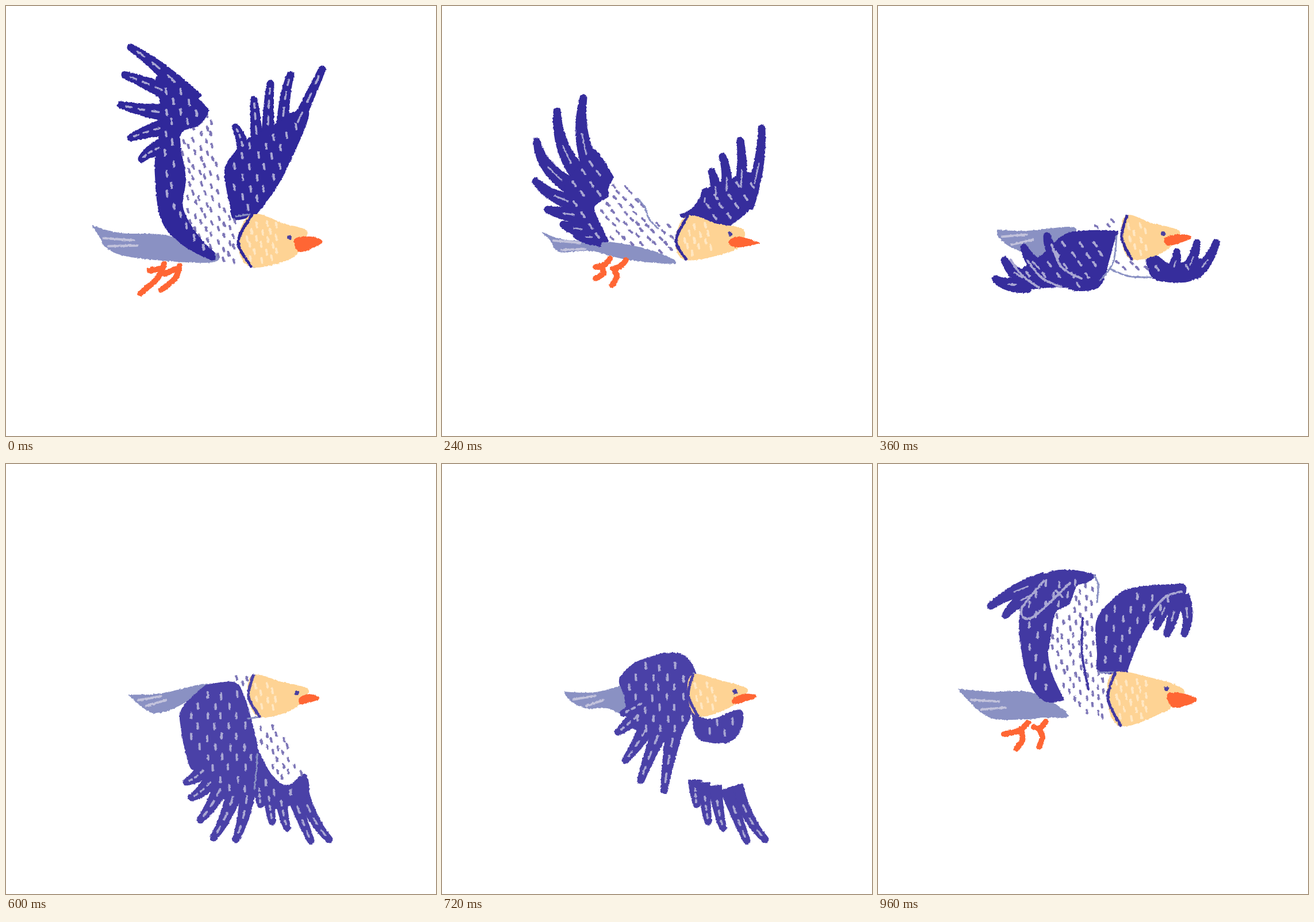
An HTML page that plays this animation: 748x748 px, repeating every 1080 ms.

```html
<!DOCTYPE html>
<html lang="en">
<head>
<meta charset="utf-8">
<title>Flying bird</title>
<style>
html, body { margin: 0; width: 100%; height: 100%; overflow: hidden; background: #fff; }
svg { display: block; width: 100vw; height: 100vh; }
path { stroke-linecap: round; stroke-linejoin: round; }
</style>
</head>
<body>
<svg viewBox="0 0 748 748">
  <filter id="chalk" filterUnits="userSpaceOnUse" x="0" y="0" width="748" height="748" color-interpolation-filters="sRGB">
    <feTurbulence type="fractalNoise" baseFrequency=".25" numOctaves="2" seed="4"/>
    <feDisplacementMap in="SourceGraphic" scale="3.5" xChannelSelector="R" yChannelSelector="G"/>
    <feGaussianBlur stdDeviation=".6"/>
  </filter>
  <g id="bird" filter="url(#chalk)"></g>
</svg>
<script>
const STEP = 120;
const LIGHT = '#aaa8d3', VIOLET = '#7d76b7', SLATE = '#8a91c3', PALE = '#c3c3dc';
const CREAM = '#ffe7c2', ORANGE = '#ff6634', SKIN = '#fed394';

// Key points; "|" parts the pieces, "!" makes a corner.
// A plume is root, bend and tip. The head runs from the nape round the collar to the brow.
const up = {
  blue: '#30289a', slant: 73, marks: 3,
  tail: '151,383! 200,396 280,400 362,430 358,445 285,443 208,434 175,420 165,404!',
  legs: '275,449 264,473 234,500|250,460 268,457|302,452 294,474 270,494|276,466 301,455',
  farArm: '526,190 484,290 454,338 434,363! 398,371 390,345 381,288 398,255 430,225 470,205 500,185',
  farPlumes: '485,250 525,165 550,110|480,235 482,155 495,120|455,250 456,170 460,135|438,260 434,190 431,163|415,265 410,225 399,211',
  nearArm: '353,182! 335,207 306,218 303,245 312,300 307,350 330,395 362,429! 358,441 305,413 270,370 260,295 262,250 272,190 262,125 300,130',
  nearPlumes: '328,166 270,105 217,72|300,160 250,135 207,120|300,188 240,183 200,172|295,205 245,218 217,229|285,240 250,250 236,266',
  body: '342,185 362,190 380,340 404,368 402,450 365,440 330,405 308,350 304,240',
  head: '428,363 404,410 426,453 498,437 521,402 519,389 485,380',
  beak: '503,406 530,402 549,411 512,427', eye: '493,403',
  thin: '400,366 425,362|430,454 448,450 467,446'
};
const back = {
  blue: '#362d9c', slant: 45, marks: 1,
  tail: '176,395! 215,408 290,411 365,426 405,447 320,440 260,425 205,427 190,408',
  legs: '292,439 283,450 267,454|278,455 281,465 267,474|320,442 310,453 297,457|300,460 304,471 296,486',
  farArm: '550,310 540,345 525,363 500,382! 418,367 428,358 440,348 452,330 470,312 500,302 535,290',
  farPlumes: '530,350 557,280 556,213|515,350 526,290 519,234|490,350 502,300 488,262|475,350 480,315 469,288|455,350 458,335 458,322',
  nearArm: '298,298! 288,318 289,330 270,343 264,352 270,370 280,390 289,409! 275,410 250,404 235,390 225,370 218,345 215,310 244,272 265,250',
  nearPlumes: '268,300 232,230 246,160|250,305 200,255 200,183|245,325 172,290 165,235|250,345 195,340 163,305|255,365 210,363 184,354|265,390 225,388 211,380|275,402 250,403 234,399',
  body: '300,298 325,308 350,345 362,374 410,366 404,443 360,424 295,412 264,352 290,335',
  head: '427,366 407,408 425,441 500,427 522,410 522,388 480,380',
  beak: '499,412 515,402 551,412! 515,419', eye: '501,396',
  thin: '340,335 352,348 360,370 376,387'
};
const flat = {
  blue: '#362d9c', slant: 45, marks: 1,
  tail: '208,390! 260,392 333,385 343,396 318,420 290,440 265,432 230,418 211,402',
  farArm: '467,442! 482,433 510,450 560,440 575,455 545,477 510,480 478,472',
  farPlumes: '550,465 575,450 588,412|535,465 550,440 555,412|510,465 520,445 520,428',
  nearArm: '325,398 370,391 417,392! 410,410 402,440 385,487 345,495 318,488 250,492 230,480 255,455 290,430',
  nearPlumes: '330,450 298,430 294,400|300,470 265,450 254,420|270,480 235,470 220,442|260,482 225,490 205,475',
  body: '416,408 426,436 466,446 474,470 432,469 405,454|345,390 380,374 422,367 420,386 380,387',
  head: '433,365 424,403 441,440 495,428 522,400 518,389 475,378',
  beak: '501,403 530,398 543,404 505,416', eye: '496,396',
  thin: '415,400 409,446 387,477|403,457 436,470 475,472',
  light: '230,441 250,468 280,490|260,443 285,473 319,489|302,415 320,455 354,474'
};
const down = {
  blue: '#4a41a7', slant: 78, marks: 3,
  tail: '214,402! 270,400 348,383 340,400 315,412 290,425 258,433 240,424 225,412',
  farArm: '437,495! 463,543 490,560 520,540 525,575 500,590 470,600 440,580',
  farPlumes: '512,560 530,620 562,653|495,565 515,620 530,655|475,560 480,605 489,633|455,555 458,595 463,622|440,550 440,575 443,592',
  nearArm: '348,385! 395,380 412,400 430,460 437,500 435,570 400,590 355,565 335,535 320,525 306,465 307,425',
  nearPlumes: '420,545 422,600 400,653|405,540 390,610 361,650|385,535 365,590 338,619|370,535 345,570 323,580|355,520 335,545 314,553',
  body: '428,443 470,448 492,480 517,540 492,550 468,543 442,500|356,386 385,370 424,367 420,388 400,380',
  head: '430,368 422,405 441,439 495,428 522,402 521,390 480,380',
  beak: '511,408 526,401 544,408 513,417', eye: '506,398',
  thin: '421,443 440,440 466,437|437,505 436,530 432,565'
};
const lift = {
  blue: '#3c33a0', slant: 100, marks: 2,
  tail: '213,392! 270,395 325,378 332,405 358,436 340,444 318,415 260,424 222,410',
  legs: '317,437 303,446 289,442|302,446 306,456 298,466 284,470|322,448 324,464 315,481',
  farArm: '432,357 440,340 460,326 518,317 515,345 500,375! 460,367 445,364',
  nearArm: '325,306 380,280 435,271 457,284! 440,308 420,330 395,375 372,380 352,395 334,378 330,345 312,322',
  nearPlumes: '400,340 368,400 373,482|380,330 335,390 331,450|350,340 325,375 300,412|345,310 310,330 290,352|370,290 335,305 318,314',
  body: '437,312 433,362 430,432 396,425 394,390 415,340',
  head: '443,366 435,400 448,437 500,420 534,398 530,387 490,375',
  beak: '503,409 528,400 548,402 508,416', eye: '513,394',
  thin: '455,285 443,310 435,345', light: '472,369 490,349 512,336'
};
const rise = {
  blue: '#4239a2', slant: 83, marks: 1,
  tail: '140,392! 195,397 270,399 330,437 285,440 262,443 205,443 178,430 158,411',
  legs: '261,450 245,464 219,470|250,465 251,481 241,495|292,448 282,459 271,458|281,462 286,476 280,492',
  farArm: '381,272 410,235 440,217 510,210 535,214 527,255! 490,260 465,285 440,340 433,363! 385,362 382,330',
  farPlumes: '530,230 545,265 533,295|520,235 512,275 503,295|505,235 495,260 484,283',
  nearArm: '378,194! 365,205 345,212 332,243 308,258 300,300 295,330 303,367 323,410! 290,412 262,375 247,300 248,258 250,215 300,188 345,186',
  nearPlumes: '290,205 240,215 196,247|300,215 245,230 222,263',
  body: '346,210 379,205 382,340 400,370 394,445 365,436 325,400 298,330 306,260 335,240',
  head: '412,363 400,408 422,455 498,430 528,405 526,389 480,374',
  beak: '504,401 530,400 553,411 516,423', eye: '502,391',
  thin: '376,194 383,210 381,240|384,363 412,362', dark: '356,268 355,330 366,392',
  light: '288,204 250,252 268,267 334,207|309,220 321,231|474,260 500,231 528,222'
};

const lerp = (a, b, k) => a + (b - a) * k;
const between = (p, q, k = .5) => ({ x: lerp(p.x, q.x, k), y: lerp(p.y, q.y, k), sharp: p.sharp });
const isShape = v => Array.isArray(v);

const parse = s => s.split('|').map(part => part.split(' ').map(p => {
  const [x, y] = p.split(',').map(parseFloat);
  return { x, y, sharp: p.endsWith('!') };
}));

function read(pose) {
  const out = { ...pose };
  for (const key in pose) if (/^\d+,/.test(pose[key])) out[key] = parse(pose[key]);
  return out;
}

// A pose halfway between two others
function halfway(a, b) {
  const out = { ...a };
  for (const key in a) if (isShape(a[key]) && isShape(b[key]))
    out[key] = a[key].slice(0, b[key].length).map((part, i) =>
      part.slice(0, b[key][i].length).map((p, j) => between(p, b[key][i][j])));
  return out;
}

function curve(pts, closed) {
  const n = pts.length;
  const at = i => closed ? pts[(i + n) % n] : pts[Math.max(0, Math.min(n - 1, i))];
  const handle = (i, dir) => {
    const p = at(i), a = at(i - 1), b = at(i + 1), k = p.sharp ? 0 : dir * .17;
    return `${p.x + (b.x - a.x) * k} ${p.y + (b.y - a.y) * k}`;
  };
  let d = `M${pts[0].x} ${pts[0].y}`;
  for (let i = 0; i < n - (closed ? 0 : 1); i++)
    d += `C${handle(i, 1)} ${handle(i + 1, -1)} ${at(i + 1).x} ${at(i + 1).y}`;
  return d + (closed ? 'Z' : '');
}

const fill = (d, color) => `<path d="${d}" fill="${color}" stroke="${color}" stroke-width="2"/>`;
const line = (d, color, w) => `<path d="${d}" fill="none" stroke="${color}" stroke-width="${w}"/>`;
const blob = (pts, color) => fill(curve(pts, true), color);
const strokes = (parts = [], color, w) => parts.map(p => line(curve(p), color, w)).join('');

function dashes(spots, slant, len, color) {
  const a = slant * Math.PI / 180, dx = Math.cos(a) * len / 2, dy = Math.sin(a) * len / 2;
  return line(spots.map(p => `M${p.x - dx} ${p.y - dy}l${2 * dx} ${2 * dy}`).join(''), color, 4);
}

function inside(x, y, poly) {
  let hit = false;
  poly.forEach((a, i) => {
    const b = poly[(i + 1) % poly.length];
    if (a.y > y !== b.y > y && x < a.x + (b.x - a.x) * (y - a.y) / (b.y - a.y)) hit = !hit;
  });
  return hit;
}

// Staggered, slightly uneven rows of spots kept clear of the outline
function scatter(poly, sx, sy, margin) {
  let seed = 7, row = 0;
  const jitter = () => (seed = seed * 16807 % 2147483647) / 2147483647 * 6 - 3;
  const xs = poly.map(p => p.x), ys = poly.map(p => p.y), spots = [];
  for (let y = Math.min(...ys) + 5; y < Math.max(...ys); y += sy, row++)
    for (let x = Math.min(...xs) + 4 + row % 2 * sx / 2; x < Math.max(...xs); x += sx) {
      const p = { x: x + jitter(), y: y + jitter() };
      const clear = [-margin, margin].every(m => inside(p.x + m, p.y, poly) && inside(p.x, p.y + m, poly));
      if (clear) spots.push(p);
    }
  return spots;
}

const onPlume = ([a, b, c], t) => between(between(a, b, t), between(b, c, t), t);

// Tapering feather with a round tip
function plume(f, root, tip) {
  const left = [], right = [];
  for (let t = 0; t < 1.01; t += .125) {
    const p = onPlume(f, t), q = onPlume(f, t + .01), r = lerp(root, tip, t);
    const a = Math.atan2(q.y - p.y, q.x - p.x), dx = Math.sin(a) * r, dy = -Math.cos(a) * r;
    left.push(`${p.x + dx} ${p.y + dy}`);
    right.unshift(`${p.x - dx} ${p.y - dy}`);
  }
  return `M${left.join('L')}A${tip} ${tip} 0 0 1 ${right.join('L')}Z`;
}

function markPlume(f, count) {
  let d = '';
  for (let i = 0; i < count; i++) {
    const t = .3 + i * .24, p = onPlume(f, t), q = onPlume(f, t + (count > 1 ? .11 : .25));
    d += `M${p.x} ${p.y}L${q.x} ${q.y}`;
  }
  return line(d, LIGHT, count > 1 ? 3.6 : 2.8);
}

function wing([arm], plumes = [], root, pose) {
  return plumes.map(f => fill(plume(f, root, 5.5), pose.blue)).join('') + blob(arm, pose.blue) +
    plumes.map(f => markPlume(f, pose.marks)).join('') +
    dashes(scatter(arm, 26, 18, 8), pose.slant + 10, 9, LIGHT);
}

function tail([t]) {
  const streaks = [0, .9].map(k => {
    const p = between(between(t[8], t[7], k), t[2], .04);
    return [p, between(p, between(t[2], t[3]), .35)];
  });
  return blob(t, SLATE) + strokes(streaks, PALE, 4);
}

function head(pose) {
  const [h] = pose.head, [[eye]] = [pose.eye[0]];
  const cheek = [h[0], h[1], h[2], between(h[2], h[3], .7), between(h[0], h[6], .9)];
  return blob(h, SKIN) + dashes(scatter(cheek, 18, 12, 5), 80, 8, CREAM) +
    line(curve(h.slice(0, 3)), pose.blue, 5) + blob(pose.beak[0], ORANGE) +
    `<circle cx="${eye.x}" cy="${eye.y}" r="4" fill="#4a40a0"/>`;
}

function draw(pose) {
  const spots = pose.body.map(poly => dashes(scatter(poly, 20, 11, 2), pose.slant, 6, VIOLET)).join('');
  return '<g>' + tail(pose.tail) + strokes(pose.legs, ORANGE, 10) +
    wing(pose.farArm, pose.farPlumes, 11, pose) + spots +
    wing(pose.nearArm, pose.nearPlumes, 16, pose) + strokes(pose.thin, SLATE, 3) +
    strokes(pose.dark, pose.blue, 4) + strokes(pose.light, LIGHT, 4) + head(pose) + '</g>';
}

const [a, b, c, d, e, f] = [up, back, flat, down, lift, rise].map(read);
const cycle = [a, halfway(a, b), b, c, halfway(c, d), d, halfway(d, e), e, f];
const bird = document.getElementById('bird');
bird.innerHTML = cycle.map(draw).join('');
const groups = [...bird.children];

function show(ms) {
  const now = Math.floor(ms / STEP) % groups.length;
  groups.forEach((g, i) => g.setAttribute('display', i === now ? 'inline' : 'none'));
}

let start;
function tick(t) {
  start ??= t;
  show(Math.max(0, t - start));
  requestAnimationFrame(tick);
}
show(0);
requestAnimationFrame(tick);
</script>
</body>
</html>
```
